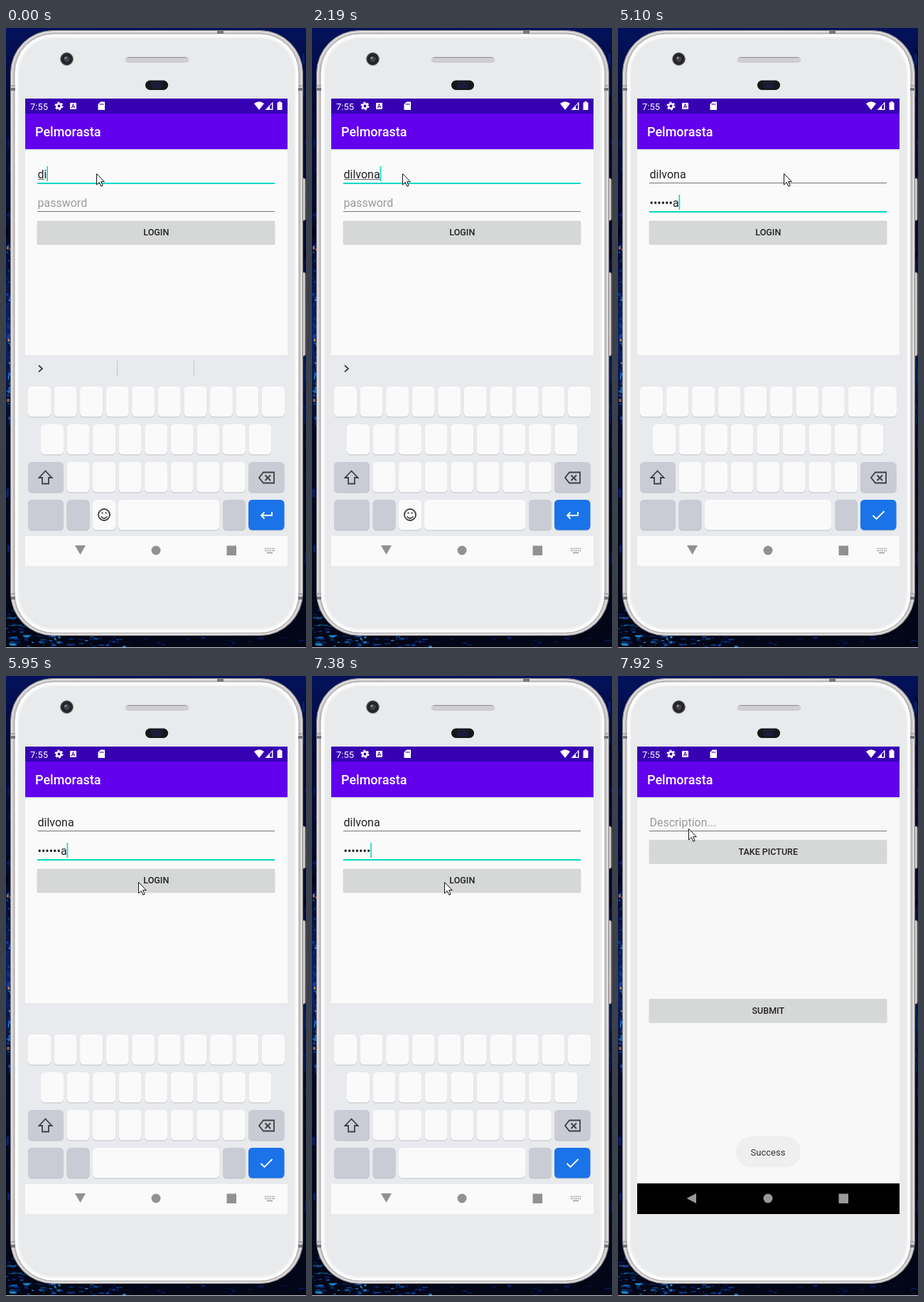
An HTML page that plays this animation: 422x870 px, repeating every 8 s.

```html
<!DOCTYPE html>
<html lang="en">
<head>
<meta charset="utf-8">
<title>Login demo</title>
<style>
html, body { margin: 0; width: 100%; height: 100%; overflow: hidden; background: #030a2e; }
svg { display: block; width: 422px; height: 870px; }
text { font: 16px Roboto, sans-serif; fill: #222; }
.cap { font-size: 12.5px; font-weight: 500; text-anchor: middle; }
.hint { fill: #9a9a9a; }
.icon { fill: none; stroke: #3c4043; stroke-width: 1.8; }
.teal { fill: #03dac5; }
</style>
</head>
<body>
<svg viewBox="0 0 422 870">
  <defs>
    <linearGradient id="sky" x2="0" y2="1">
      <stop offset="0" stop-color="#03125c"/>
      <stop offset=".1" stop-color="#020a3a"/>
      <stop offset=".34" stop-color="#030a30"/>
      <stop offset=".5" stop-color="#08246e"/>
      <stop offset=".64" stop-color="#030a28"/>
      <stop offset="1" stop-color="#020616"/>
    </linearGradient>
    <linearGradient id="metal">
      <stop offset="0" stop-color="#d2cdcd"/>
      <stop offset=".5" stop-color="#e0dddd"/>
      <stop offset="1" stop-color="#c8c3c3"/>
    </linearGradient>
    <filter id="soft"><feGaussianBlur stdDeviation="1.5"/></filter>
    <clipPath id="view"><rect x="27" y="99" width="369" height="656"/></clipPath>
  </defs>

  <rect width="422" height="870" fill="url(#sky)"/>
  <g id="lights"></g>
  <path d="M0 869.5H422" stroke="#c9ccd6"/>

  <g id="phone">
    <g fill="#d3d0d0" stroke="#8e8b8c">
      <rect x="415" y="211" width="6" height="59" rx="2"/>
      <rect x="415" y="343" width="6" height="117" rx="2"/>
      <rect x="6.500" y="3.500" width="411" height="849" rx="60" fill="url(#metal)"/>
      <rect x="8.500" y="5.500" width="407" height="845" rx="58" fill="#c9c5c5" stroke="#eeecec"/>
      <rect x="12" y="8" width="400" height="841" rx="55" fill="#fff" stroke="#a3a1a3"/>
    </g>
    <rect x="17" y="13" width="390" height="831" rx="50" fill="#e8eaec" filter="url(#soft)"/>
    <path d="M297 6h9M7 86h6M411 86h6M7 800h6M411 800h6" stroke="#77757a" stroke-width="4"/>
    <path d="M7 81h6M411 81h6M7 794h6M411 794h6" stroke="#aaa7a9" stroke-width="2"/>
    <circle cx="85.500" cy="43.500" r="9" fill="#29292d" stroke="#8b8b90"/>
    <circle cx="85.500" cy="43.500" r="5" fill="#3f4148" stroke="#111"/>
    <circle cx="84" cy="42" r="1.600" fill="#8d96a5"/>
    <rect x="168.500" y="41" width="88" height="7" rx="3.500" fill="#d0d0d2" stroke="#c4c4c7"/>
    <path d="M171 41.500h83" stroke="#98989c"/>
    <rect x="196" y="73.500" width="32" height="13.500" rx="6.500" fill="#17171a"/>
    <rect x="204" y="75" width="16" height="10" rx="3" fill="#1b1b38"/>
  </g>

  <g clip-path="url(#view)">
    <rect x="27" y="170" width="369" height="585" fill="#fafafa"/>

    <g id="login">
      <text id="user" x="44.500" y="211"></text>
      <rect id="compose" x="45" y="212" height="1" fill="#666"/>
      <rect id="line0" x="44" y="217" width="334"/>
      <text id="pass" x="44.500" y="251"></text>
      <rect id="line1" x="44" y="257" width="334"/>
      <rect id="caret" class="teal" width="1.600" height="21"/>
      <g data-button="270.500,LOGIN"></g>
    </g>

    <g id="board">
      <rect x="27" y="459" width="369" height="254" fill="#e8eaed"/>
      <g id="keys"></g>
      <g id="passKeys">
        <path d="M358.500 684l5 5 11-11" fill="none" stroke="#fff" stroke-width="1.800"/>
      </g>
      <g id="textKeys">
        <path class="icon" d="M46 473.500l5 4.500-5 4.500"/>
        <path id="dividers" d="M156.500 467v22M264.500 467v22" stroke="#c2c4c8"/>
      </g>
      <path class="icon" d="M55.500 621.500l9 9.500h-4.500v8.500h-9v-8.500h-4.500z"/>
      <path class="icon" d="M362 623.500h15v15h-15l-6-7.500zM364.500 627.500l7.500 7.500m0-7.500l-7.500 7.500"/>
      <rect x="27" y="713" width="369" height="42" fill="#fafafa"/>
      <g fill="#919191">
        <path d="M97 726h15l-7.500 13z"/>
        <circle cx="211" cy="733" r="6.500"/>
        <rect x="310.500" y="726.500" width="13.500" height="13.500"/>
      </g>
      <path d="M364 730.500h14M364 733.500h14" stroke="#999" stroke-width="1.500" stroke-dasharray="1.500 1"/>
      <path d="M367 736.500h8" stroke="#999" stroke-width="1.500"/>
    </g>

    <g id="post">
      <rect x="27" y="170" width="369" height="542" fill="#f8f8f8"/>
      <text class="hint" x="44.500" y="211">Description...</text>
      <rect x="44" y="217" width="334" height="1" fill="#757575"/>
      <g data-button="230,TAKE PICTURE"></g>
      <g data-button="453,SUBMIT"></g>
      <rect x="27" y="712" width="369" height="43"/>
      <g fill="#999">
        <path d="M110 726v14l-13.500-7z"/>
        <circle cx="211" cy="733" r="6.500"/>
        <rect x="310.500" y="726.500" width="13.500" height="13.500"/>
      </g>
      <g id="toast">
        <rect x="166" y="646" width="91" height="43.500" rx="21" fill="#efefef"/>
        <text x="211" y="673" style="font-size:13px;text-anchor:middle;fill:#333">Success</text>
      </g>
    </g>

    <rect x="27" y="170" width="369" height="2" fill="#000" opacity=".08"/>
    <rect x="27" y="120" width="369" height="50" fill="#6200ee"/>
    <rect x="27" y="99" width="369" height="21" fill="#3700b3"/>
    <text x="41" y="152" style="font-size:18px;font-weight:500;fill:#fff">Pelmorasta</text>
    <text x="34" y="114.500" style="font-size:13px;fill:#fff">7:55</text>
    <g fill="#fff">
      <circle cx="74.500" cy="109.500" r="3.200" fill="none" stroke="#fff" stroke-width="2.500"/>
      <circle cx="74.500" cy="109.500" r="5" fill="none" stroke="#fff" stroke-width="2" stroke-dasharray="2.600 2.636"/>
      <rect x="90" y="105" width="9" height="9" rx="1"/>
      <path d="M92.300 112.500l2.200-6 2.200 6m-3.500-2h2.600" fill="none" stroke="#3700b3"/>
      <path d="M133 103.500h6v11.500h-9.500v-8z"/>
      <path d="M132.500 106v2M134.500 106v2M136.500 106v2" stroke="#3700b3"/>
      <path d="M349 106q7-5.500 14 0l-7 9z"/>
      <path d="M375.500 103.500v11.500h-11z"/>
      <path d="M371 109.500v4h3v-7z" fill="#3700b3"/>
      <path d="M381.500 104.500h2v-1.500h3v1.500h2v10.500h-7z"/>
    </g>
  </g>

  <path id="mouse" d="M.5.5v15.500l3.700-3.500 2.600 5.700 2.300-1-2.500-5.600h4.700z" fill="#fff" stroke="#111"/>
</svg>

<script>
const $ = id => document.getElementById(id);
const NAME = "dilvona", LOOP = 8000;
const pen = document.createElement("canvas").getContext("2d");

function add(parent, tag, attrs) {
  const el = document.createElementNS("http://www.w3.org/2000/svg", tag);
  set(el, attrs);
  return parent.appendChild(el);
}
function set(el, attrs) {
  for (const k in attrs) el.setAttribute(k, attrs[k]);
}
function show(id, on) {
  $(id).style.display = on ? "" : "none";
}
function width(s) {
  pen.font = "16px Roboto, sans-serif";
  return pen.measureText(s).width;
}

// City lights around the phone
let seed = 7;
const rnd = () => (seed = seed * 16807 % 2147483647) / 2147483647;
function lights(n, x, y, w, h, maxW, maxH, colors) {
  for (let i = 0; i < n; i++)
    add($("lights"), "rect", {
      x: x + rnd() * w, y: y + rnd() * h, width: 1 + rnd() * maxW, height: 1 + rnd() * maxH,
      opacity: 0.3 + rnd() * 0.6, fill: colors[Math.floor(rnd() * colors.length)]
    });
}
const dark = ["#01041a", "#020828", "#0a237a"];
const bright = ["#0b4fc0", "#1470e0", "#0a2f8e", "#22a6f0"];
lights(70, 0, 90, 6, 720, 3, 12, dark);
lights(45, 0, 300, 5, 250, 3, 5, [...bright, "#d69a62"]);
lights(60, 417, 0, 4, 860, 3, 14, dark);
lights(110, 0, 815, 75, 54, 9, 2, bright);
lights(50, 75, 853, 90, 15, 8, 1.5, [...bright, ...dark]);
lights(40, 165, 853, 257, 15, 8, 2, dark);

// Buttons
for (const g of document.querySelectorAll("[data-button]")) {
  const [y, label] = g.dataset.button.split(",");
  add(g, "rect", { x: 43.5, y: +y + 0.5, width: 335, height: 33.5, rx: 2, fill: "#000", opacity: 0.13 });
  add(g, "rect", { class: "face", x: 44, y, width: 334, height: 32.5, rx: 1.5, fill: "#d6d7d7" });
  add(g, "text", { class: "cap", x: 211.3, y: Math.floor(y) + 21 }).textContent = label;
}
const face = document.querySelector("#login .face");

// Keyboard
function key(x, y, w = 32, fill = "#fafafa", group = "keys") {
  const shape = { x, width: w, height: 42.5, rx: 5.5 };
  const g = $(group), below = g.firstChild;
  for (const attrs of [{ y: y + 1, fill: "#bfc1c6" }, { y, fill }])
    g.insertBefore(add(g, "rect", { ...shape, ...attrs }), group === "keys" ? null : below);
}
const GRAY = "#c9ccd4", PITCH = 36.55;
for (const [x, y, n] of [[31, 503, 10], [49, 556, 9], [85.5, 609, 7]])
  for (let i = 0; i < n; i++) key(x + i * PITCH, y);
key(31, 609, 50, GRAY);
key(341, 609, 50.5, GRAY);
key(31, 662, 50, GRAY);
key(85.5, 662, 32, GRAY);
key(305, 662, 32, GRAY);
key(341, 662, 50.5, "#1a73e8");
key(122, 662, 178, "#fafafa", "passKeys");
key(122, 662, 32, "#fafafa", "textKeys");
key(158, 662, 142, "#fafafa", "textKeys");

// Emoji and return icons
const emoji = add($("textKeys"), "g", { class: "icon" });
add(emoji, "circle", { cx: 138, cy: 683, r: 8 });
add(emoji, "path", { d: "M133.500 685.500q4.500 5 9 0M134.500 680.500h2M139.500 680.500h2" });
add($("textKeys"), "path", { d: "M374 679v5h-15m4.500-4.500l-4.500 4.500 4.500 4.500",
  fill: "none", stroke: "#fff", "stroke-width": 1.8 });

// Latest value of a list of [time, value] pairs
const at = (t, list) => list.reduce((v, [time, next]) => t >= time ? next : v, null);
const flips = (t, times) => times.filter(x => t >= x).length % 2;

const typed = [[0, 2], [420, 3], [740, 4], [1070, 5], [1940, 6], [2060, 7]];
const underlined = [[0, 1], [260, 2], [420, 3], [740, 4], [1070, 5], [1380, 0], [1530, 5], [2060, 6], [2190, 7]];
const stripFlips = [260, 580, 740, 900, 1070, 1230, 1380, 1530, 1940, 2620];
const secret = [[0, 0], [4380, 2], [4670, 3], [4950, 5], [5100, 7]];
const caretFlips = [3230, 3540, 3980, 4380, 5820, 5950];
const press = [[0, "#d6d7d7"], [6220, "#c6c8c7"], [6340, "#babcbb"], [6480, "#cacccb"], [6630, "#d6d7d7"]];
const pointer = [[0, [127, 204]], [3390, [150, 204]], [3540, [191, 204]], [3690, [233, 204]],
  [5690, [244, 236]], [5820, [219, 276]], [5950, [186, 289]],
  [7640, [150, 260]], [7780, [116, 230]], [7920, [99, 214]]];

function line(id, active) {
  set($(id), { height: active ? 2 : 1, fill: active ? "#03dac5" : "#757575" });
}

function draw(t) {
  const onPass = t >= 2770;
  const name = NAME.slice(0, at(t, typed));
  const n = at(t, secret);
  const dots = t >= 6630 ? "•".repeat(n) : n ? "•".repeat(n - 1) + NAME[n - 1] : "";

  $("user").textContent = name;
  $("pass").textContent = dots || "password";
  $("pass").setAttribute("class", dots ? "" : "hint");
  set($("compose"), { width: onPass ? 0 : width(NAME.slice(0, at(t, underlined))) });
  line("line0", !onPass);
  line("line1", onPass);
  set($("caret"), { x: 44.5 + width(onPass ? dots : name), y: onPass ? 234 : 194 });
  show("caret", !flips(t, caretFlips));
  set(face, { fill: at(t, press) });

  show("textKeys", !onPass);
  show("passKeys", onPass);
  show("dividers", !flips(t, stripFlips));

  show("post", t >= 7500);
  set($("post"), { opacity: at(t, [[0, 0.5], [7640, 1]]),
    transform: `translate(0 ${t < 7640 ? 16 : 0})` });
  show("toast", t >= 7920);
  set($("mouse"), { transform: `translate(${at(t, pointer)})` });
}

function tick() {
  draw(performance.now() % LOOP);
  requestAnimationFrame(tick);
}
tick();
</script>
</body>
</html>
```
